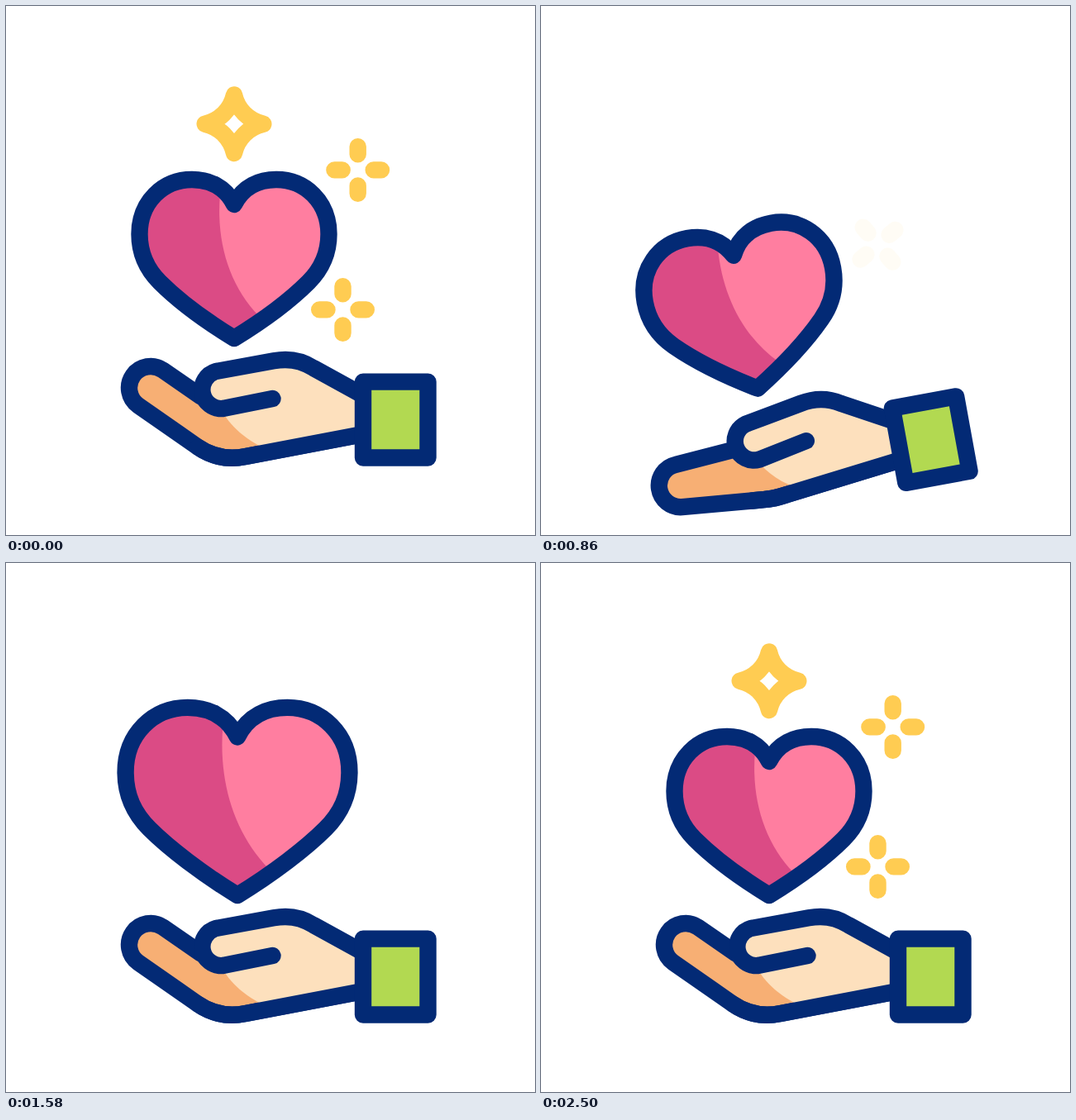
Recreate the animation shown at these times as an HTML page. Size 640 by 640 pixels, loop 2.52 s.

```html
<!DOCTYPE html>
<html lang="en">
<head>
<meta charset="utf-8">
<title>Giving hand</title>
<style>
  html, body { margin: 0; width: 100%; height: 100%; overflow: hidden; background: #fff; }
  svg { display: block; width: 100%; height: 100%; }
  .line { stroke: #032a75; stroke-width: 20.4; stroke-linecap: round; stroke-linejoin: round; }
  .star { fill: none; stroke: #ffcc52; stroke-linecap: round; stroke-linejoin: round; }
</style>
</head>
<body>
<svg viewBox="0 0 640 640">
  <defs>
    <path id="heartShape" d="M276 240C265 218 245 210 225 210C190 210 161.5 237 161.5 276C161.5 300 170 318 186 334C206 354 240 380 276 402C312 380 346 354 366 334C382 318 390.5 300 390.5 276C390.5 237 362 210 327 210C307 210 287 218 276 240Z"/>
    <clipPath id="heartClip"><use href="#heartShape"/></clipPath>
  </defs>
  <g id="scene">
    <path id="finger" class="line" fill="#f7af74"/>
    <path fill="#fde0bd" d="M312 535C292 525 275 512 263 493L262.5 487A23 23 0 0 1 254 442L324 429C341 426 358 429 372 438L432 471V518Z"/>
    <path id="palm" class="line" fill="none"/>
    <path class="line" fill="none" d="M322.500 475L262.500 487A23 23 0 0 1 254 442L324 429.300C341 426 358 429 372 438L432 471"/>
    <rect class="line" fill="#b2d951" x="432" y="454.600" width="78.500" height="91.900"/>
    <g id="heart">
      <use href="#heartShape" fill="#db4b85"/>
      <g clip-path="url(#heartClip)">
        <path id="shine" fill="#ff7ea0" d="M259 228C254 285 270 338 306 375L330 420H420V190H259Z"/>
      </g>
      <use id="heartLine" href="#heartShape" class="line" fill="none"/>
    </g>
  </g>
  <g id="stars"></g>
</svg>
<script>
const LOOP = 2520, WIDTH = 20.4, RAD = Math.PI / 180;
const $ = id => document.getElementById(id);
const set = (el, attrs) => { for (const k in attrs) el.setAttribute(k, attrs[k]); };
const ramp = (t, start, span) => Math.min(1, Math.max(0, (t - start) / span));
const ease = (t, start, span) => { const u = ramp(t, start, span); return u * u * (3 - 2 * u); };

const sparkle = "M0-35.3C4-17.5 17.5-4 35.3 0C17.5 4 4 17.5 0 35.3C-4 17.5-17.5 4-35.3 0C-17.5-4-4-17.5 0-35.3Z";
const burst = "M0-19V-28.300M19 0H28.300M0 19V28.300M-19 0H-28.300";

// rise / drop: vertical travel while leaving / before arriving
const stars = [
  { d: sparkle, x: 276, y: 142.7, turn: -45, out: 0, rise: -32.4, back: 1600, drop: 30 },
  { d: burst, x: 425.7, y: 198.4, turn: 45, out: 40, rise: -58.5, back: 1620, drop: 83 },
  { d: burst, x: 407.5, y: 367.4, turn: -45, out: 100, rise: -88.5, back: 1700, drop: 46 }
].map(s => {
  const el = document.createElementNS("http://www.w3.org/2000/svg", "path");
  set(el, { d: s.d, class: "star" });
  $("stars").append(el);
  return { ...s, el };
});

function drawStar(s, t) {
  const leaving = t < 1400;
  const f = leaving ? ease(t, s.out, 960) : 1 - ease(t, s.back, 800);
  const alpha = leaving ? 1 - ramp(t, s.out, 810) : ramp(t, s.back, 800);
  const turn = (leaving ? s.turn : -s.turn) * RAD;
  // points travel in straight lines between the two poses
  const a = 1 - f + f * Math.cos(turn), b = f * Math.sin(turn);
  const y = s.y + f * (leaving ? s.rise : s.drop);
  set(s.el, {
    transform: `matrix(${a} ${b} ${-b} ${a} ${s.x} ${y})`,
    "stroke-width": WIDTH / Math.hypot(a, b),
    opacity: alpha
  });
}

function drawFinger(p) {
  const cx = 175 - 12.5 * p, cy = 462 + 41.6 * p;
  const up = (35 - 40 * p) * RAD, low = (35 - 31 * p) * RAD;
  const top = [cx + 26 * Math.sin(up), cy - 26 * Math.cos(up)];
  const bottom = [cx - 26 * Math.sin(low), cy + 26 * Math.cos(low)];
  const base = [232 + 14 * p, 533.5 + p];
  const heel = [290 - 2 * p, 545 - 11 * p];
  const c1 = [base[0] + 22 * Math.cos(low), base[1] + 22 * Math.sin(low)];
  const c2 = [heel[0] - 20 + 5 * p, heel[1] + 4 - 2 * p];
  const edge = `M432 518L${heel}C${c2} ${c1} ${base}`;
  set($("finger"), { d: `${edge}L${bottom}A26 26 0 0 1 ${top}L236 ${472.5 - 3 * p}` });
  set($("palm"), { d: edge });
}

function draw(t) {
  const p = ease(t, 0, 800) - ease(t, 800, 400);
  const grow = 0.32 * (ease(t, 800, 600) - ease(t, 1400, 400));
  const k = 1 + grow;
  set($("scene"), { transform: `rotate(${-11 * p} 605 510)` });
  drawFinger(p);
  set($("heart"), { transform: `translate(254 402) scale(${k}) translate(-254 -402)` });
  $("heartLine").style.strokeWidth = WIDTH / k;
  set($("shine"), { transform: `translate(${12 * grow} 0)` });
  for (const s of stars) drawStar(s, t);
}

const began = performance.now();
function tick() {
  draw((performance.now() - began) % LOOP);
  requestAnimationFrame(tick);
}
tick();
</script>
</body>
</html>
```
